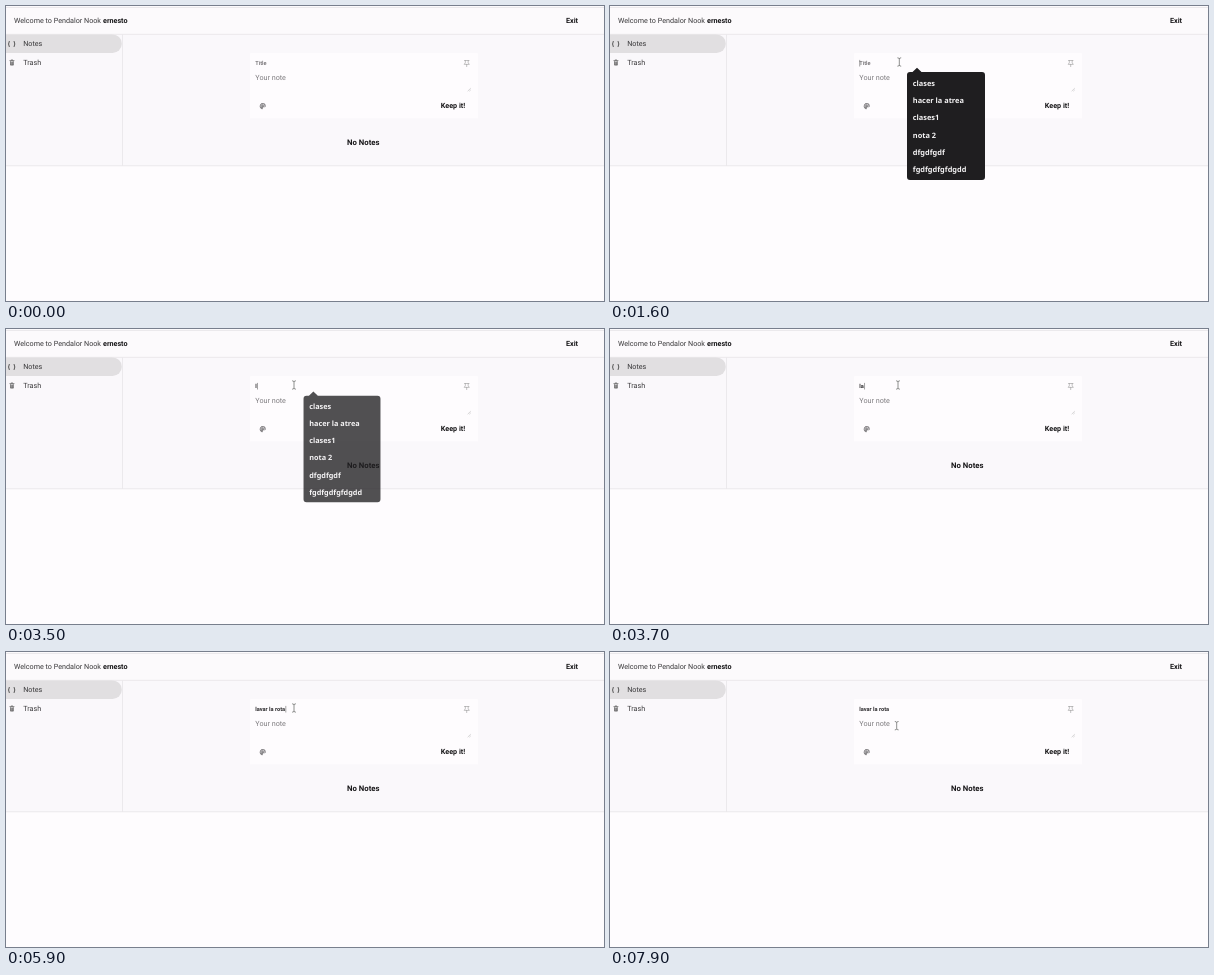
An HTML page for the animation above (8 s loop, 598 px wide and 295 px high).

```html
<!DOCTYPE html>
<html lang="en">
<head>
<meta charset="utf-8">
<title>Notes</title>
<style>
  html, body { margin: 0; width: 100%; height: 100%; overflow: hidden; background: #fefcfe; }
  svg { display: block; width: 598px; height: 295px; }
  text { font: 400 7.2px Roboto, sans-serif; fill: #39383a; white-space: pre; text-rendering: geometricPrecision; }
  .bold { font-weight: 700; fill: #171618; }
  .title { font-size: 5.65px; }
  .hint { fill: #7d7b7e; }
  #popup text { font: 600 7.4px "Noto Sans", sans-serif; fill: #f3f2f3; }
  .rule { stroke: #ebe9ec; fill: none; }
  .icon { stroke: #555; fill: none; stroke-linecap: round; }
</style>
</head>
<body>
<svg viewBox="0 0 598 295">
  <defs>
    <path id="ibeam" d="M-1.9 -4.2Q0 -4.2 0 -3Q0 -4.2 1.9 -4.2M0 -3V3M-1.9 4.2Q0 4.2 0 3Q0 4.2 1.9 4.2"/>
  </defs>

  <!-- page -->
  <rect width="598" height="160" fill="#faf8fb"/>
  <rect width="598" height="28" fill="#fcfafc"/>
  <path class="rule" d="M0 1.5H598M0 28.3H598M116.5 28V160M0 159.8H598"/>
  <path d="M0 28.4H106.5a9.3 9.3 0 0 1 0 18.6H0Z" fill="#e1dfe1"/>
  <rect x="244" y="47" width="228" height="65.5" rx="1" fill="#fefcfe"/>

  <text x="8" y="16.8">Welcome to Pendalor Nook</text>
  <text class="bold" x="97" y="16.8">ernesto</text>
  <text class="bold" x="560" y="16.8">Exit</text>
  <text x="17.2" y="39.8">Notes</text>
  <text x="17.2" y="58.7">Trash</text>
  <text class="hint" x="249.3" y="74.3">Your note</text>
  <text class="bold" x="434.8" y="101.8">Keep it!</text>
  <text class="bold" x="341" y="138.8" style="font-size:7.75px">No Notes</text>

  <!-- icons -->
  <path class="icon" d="M3.2 35.4Q1.8 38 3.2 40.6M8.2 35.4Q9.6 38 8.2 40.6"/>
  <path class="icon" stroke-width=".7" d="M3.9 54.6H8M5.3 54H6.6M4.5 55.6V59.1H7.4V55.6M5.4 56V58.6M6.5 56V58.6"/>
  <path class="icon" stroke-width=".6" style="stroke:#999" d="M458.5 54.5H463M459.3 54.6V56.8L458.2 58.4H463.3L462.2 56.8V54.6M460.7 58.5V60.6"/>
  <path class="rule" style="stroke:#bbb" stroke-width=".6" d="M461.7 85.2L464.8 82.1M463.4 85.2L464.8 83.8"/>
  <path fill="#8a888b" d="M256.6 103.3a3.1 3.1 0 1 1 3.2 -3.3q0 1.3 -1.3 1.3h-1q-.8 0 -.6 .9Z"/>
  <g fill="#fefcfe">
    <circle cx="255" cy="100" r=".5"/><circle cx="256" cy="98.7" r=".5"/>
    <circle cx="257.6" cy="98.8" r=".5"/><circle cx="258.4" cy="100" r=".5"/>
  </g>

  <text id="title" class="title" x="249.3" y="58.9"></text>
  <path id="caret" d="M0 -3.3V3.3" stroke="#666" stroke-width=".6"/>

  <g id="popup">
    <path d="M300 66H302.5L307 61.8L311.5 66H372a3 3 0 0 1 3 3V171a3 3 0 0 1 -3 3H300a3 3 0 0 1 -3 -3V69a3 3 0 0 1 3 -3Z" fill="#1f1e20"/>
  </g>

  <g id="mouse">
    <g id="beam" fill="none">
      <use href="#ibeam" stroke="#fff" stroke-width="1.6"/>
      <use href="#ibeam" stroke="#707070" stroke-width=".8"/>
    </g>
    <path id="arrow" d="M0 -4V4L1.9 2.3L3.1 4.9L4.3 4.4L3.2 1.8H5.7Z" fill="#222" stroke="#fff" stroke-width=".6"/>
  </g>
</svg>
<script>
const LOOP = 8000, STEP = 100, BLINK = 530;
const ENTER = 200, FOCUS = 1200, TYPE = 3400, RESUME = 5400, NOTE_FOCUS = 7300;
const TEXT_X = 249.3;

const $ = id => document.getElementById(id);
const [title, caret, popup, mouse, beam, arrow] =
  ['title', 'caret', 'popup', 'mouse', 'beam', 'arrow'].map($);

// 0 to 1 while t runs from start to end
const ramp = (t, start, end) => Math.min(1, Math.max(0, (t - start) / (end - start)));
const show = (el, on) => el.setAttribute('visibility', on ? 'visible' : 'hidden');

['clases', 'hacer la atrea', 'clases1', 'nota 2', 'dfgdfgdf', 'fgdfgdfgfdgdd'].forEach((word, i) => {
  const row = document.createElementNS('http://www.w3.org/2000/svg', 'text');
  row.setAttribute('x', 302.8);
  row.setAttribute('y', 79.6 + 17.35 * i);
  row.textContent = word;
  popup.append(row);
});

// Two bursts of typing, each at a steady pace.
const bursts = [
  { text: 'lavar la', start: TYPE, gap: 200 },
  { text: ' rota', start: RESUME - 160, gap: 160 }
];

function typed(t) {
  let text = '', last = FOCUS;
  for (const b of bursts) {
    if (t < Math.max(b.start, b === bursts[1] ? RESUME : 0)) break;
    const count = Math.min(b.text.length, 1 + Math.floor((t - b.start) / b.gap));
    text += b.text.slice(0, count);
    last = b.start + (count - 1) * b.gap;
  }
  return { text, last };
}

function drawTitle(t) {
  const { text, last } = typed(t);
  title.textContent = text || 'Title';
  title.style.fill = text ? '#2c2b2d' : '#6a686b';
  title.style.fontWeight = text ? 700 : 500;

  const inNote = t >= NOTE_FOCUS;
  const since = t - (inNote ? NOTE_FOCUS : last);
  const x = TEXT_X + (inNote || !text ? .4 : title.getComputedTextLength() + .7);
  caret.setAttribute('transform', `translate(${x} ${inNote ? 72 : 57.2})`);
  show(caret, since >= 0 && Math.floor(since / BLINK) % 2 === 0);
}

function drawPopup(t) {
  const opacity = ramp(t, FOCUS, FOCUS + 200) * (1 - ramp(t, TYPE, TYPE + 210) ** 2);
  const scale = .94 + .06 * opacity;
  popup.setAttribute('opacity', opacity);
  popup.setAttribute('transform', `translate(336 120) scale(${scale}) translate(-336 -120)`);
}

function drawMouse(t) {
  const arrive = ramp(t, ENTER, 1000), nudge = ramp(t, 1900, 2300), leave = ramp(t, 6200, 7100);
  const x = 362 - 72.7 * arrive - 1.3 * nudge - 1.3 * leave - 2.5 * Math.sin(Math.PI * leave);
  const y = 143 - 87 * arrive + 17.7 * leave ** 1.5;
  mouse.setAttribute('transform', `translate(${x} ${y})`);
  show(beam, t >= ENTER && y < 80);
  show(arrow, t >= ENTER && y >= 80);
}

function frame() {
  const t = Math.floor(performance.now() % LOOP / STEP) * STEP;
  drawTitle(t);
  drawPopup(t);
  drawMouse(t);
  requestAnimationFrame(frame);
}
frame();
</script>
</body>
</html>
```
